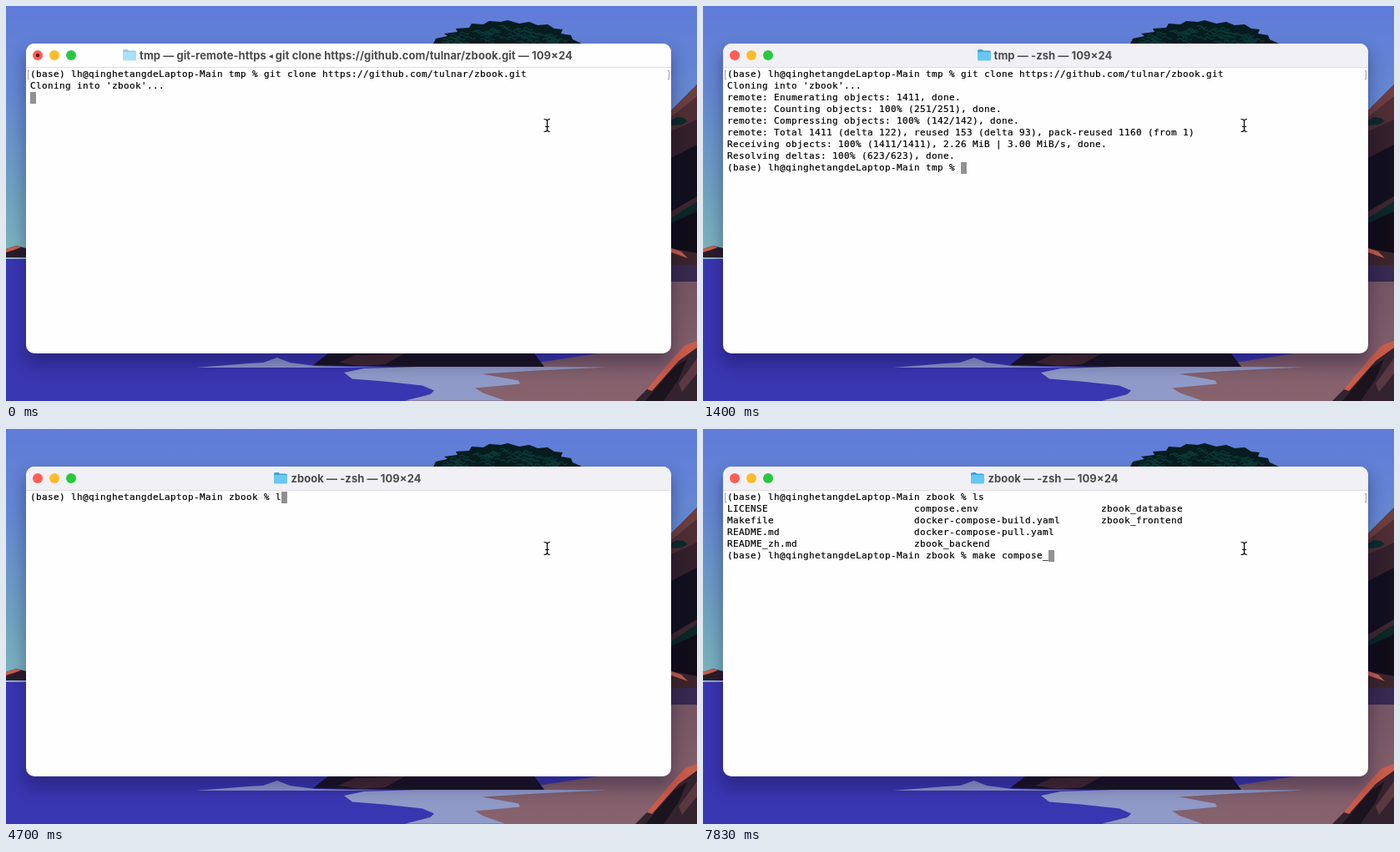
Write an HTML page that moves like this. It is 828 by 473 pixels and loops after 8 s.

```html
<!DOCTYPE html>
<html lang="en">
<head>
<meta charset="utf-8">
<title>Terminal</title>
<style>
html, body { margin: 0; width: 100%; height: 100%; overflow: hidden; }
svg { position: absolute; left: 0; top: 0; }
#win, #shadow {
  position: absolute; left: 24px; top: 45px; width: 773px; height: 371px;
  border-radius: 10px;
}
#win { background: #fefefe; overflow: hidden; }
#shadow { box-shadow: 0 11px 18px 3px rgba(12, 6, 45, .3); }
#bar {
  height: 28px; border-bottom: 1px solid #dedde0; background: #f1f0f4;
  font: 700 13px/28px Inter, sans-serif; color: #4b4a4c;
  display: flex; justify-content: center; white-space: pre;
}
#bar.plain { background: #fefefe; }
#title { margin: 0 2px 0 4px; letter-spacing: .07px; }
#title small { font-size: 9px; vertical-align: 1px; line-height: 1; }
#folder { position: static; margin-top: 6px; }
.busy #folder { opacity: .55; }
#dot { display: none; }
.busy #dot { display: inline; }
#term {
  position: absolute; left: 5px; top: 30px; margin: 0; color: #000;
  font: 11px/14px "DejaVu Sans Mono", monospace; letter-spacing: calc(7px - 1ch);
  -webkit-text-stroke: .2px #000;
}
#term div { height: 14px; position: relative; width: 763px; }
#term i {
  display: inline-block; width: 7px; height: 14px; vertical-align: top;
  background: #919191; font-style: normal;
}
.mark::before, .mark::after {
  content: ""; position: absolute; top: 2px; width: 1px; height: 9px;
  border: 1px solid #a5a5a5;
}
.mark::before { left: -3px; border-right: 0; }
.mark::after { left: 764px; border-left: 0; }
</style>
</head>
<body>
<svg width="828" height="473">
  <defs>
    <linearGradient id="sky" x2="0" y2="1">
      <stop offset="0" stop-color="#607bd9"/><stop offset=".35" stop-color="#6488d2"/>
      <stop offset=".75" stop-color="#70a3c0"/><stop offset="1" stop-color="#7db5bf"/>
    </linearGradient>
    <linearGradient id="sand" x2="0" y2="1">
      <stop offset="0" stop-color="#755563"/><stop offset="1" stop-color="#87636e"/>
    </linearGradient>
  </defs>
  <path fill="url(#sky)" d="M0 0H828V303H0z"/>
  <path fill="#3936b1" d="M0 303H828V473H0z"/>
  <path fill="#9aa5d8" d="M0 301.500h24v1H0z"/>
  <path fill="#2a1c29" d="M0 291l12-4 12 3v11H0z"/>
  <path fill="#c85f50" d="M0 291l12-4 6 2-8 3-10 3z"/>
  <!-- tree -->
  <path fill="#061c1f" d="M512 45l3-6 14-3-4-3 16-2-2-4 16-1 3-5 14 1 7-4 14 1 8-2 14 4 12-2 10 4 12-1 8 5 10 1-2 5 12 2 2 5 11 5z"/>
  <g id="leaves" fill="none" stroke="#0a3835" stroke-width="1.500"/>
  <!-- cliff -->
  <path fill="#4e2e34" d="M790 132L828 94V312H790z"/>
  <path fill="#6b3e40" d="M797 125l31-31v14l-31 25z"/>
  <path fill="#33202b" d="M797 150l31-14v30l-31 18z"/>
  <path fill="#0d2a2b" d="M797 137l7-4 8 1 5 4-7 4-13 1z"/>
  <path fill="#12101f" d="M797 182l31-16v66l-31 18z"/>
  <path fill="#3c272f" d="M797 246l31-18v8l-31 18z"/>
  <path fill="#0b2727" d="M797 254l31-20v12l-31 16z"/>
  <path fill="#100d19" d="M797 260l31-14v50l-31-4z"/>
  <path fill="#3b242b" d="M797 290l31 6v14h-31z"/>
  <path fill="#bd5b4c" d="M797 290l12 4 8 8-20-7z"/>
  <path fill="#37294f" d="M797 310h31v21h-31z"/>
  <!-- shore -->
  <path fill="url(#sand)" d="M797 330h31V473H480l40-12-45-18 150-14 130-20h42z"/>
  <path fill="#8f9ac8" d="M405 439l24-5 95-3 196 1.500-84 4-66 4 44 8 2 4-54 5 10 6 26 9H478l30-7 5-5-14-6-46-5-38-3z"/>
  <path fill="#8e98cf" d="M228 433l62-5 18-1 17-6 15 6 30 4 80 2z"/>
  <path fill="#1a1422" d="M368 430l18-14h247l12 16-165 0z"/>
  <path fill="#44292f" d="M418 418l60-2-24 13-30 2-26-4z"/>
  <!-- near rock -->
  <path fill="#33232e" d="M754 473l42-42 32-30v72z"/>
  <path fill="#c95c4b" d="M768 459l30-36 16-17 14-5v8l-22 16-32 36z"/>
  <path fill="#1b141f" d="M766 473l34-40 16-10-10 24-18 26z"/>
  <path fill="#5a3840" d="M806 452l22-30v18l-18 22z"/>
</svg>
<div id="shadow"></div>
<div id="win">
  <div id="bar">
    <svg id="folder" width="16" height="16" viewBox="0 0 16 16">
      <path fill="#3aa4dd" d="M0 3q0-2 2-2h3.500l1.500 1.500h7q2 0 2 2V13H0z"/>
      <path fill="#69c7f3" d="M0 5q0-1 1-1h14q1 0 1 1v8q0 1.500-1.500 1.500h-13Q0 14.500 0 13z"/>
    </svg><span id="title"></span>
    <svg width="70" height="28">
      <circle cx="14" cy="14" r="6" fill="#ff5d55"/>
      <circle cx="34" cy="14" r="6" fill="#febb2c"/>
      <circle cx="54" cy="14" r="6" fill="#27c840"/>
      <circle id="dot" cx="14" cy="14" r="2.200" fill="#5d0707"/>
    </svg>
  </div>
  <pre id="term"></pre>
</div>
<svg width="828" height="473" fill="none" stroke-linecap="round">
  <defs>
    <path id="ibeam" d="M645 135.500q3 0 3.500 2 .5-2 3-2M648.500 137v12M645 150.500q3 0 3.500-2 .5 2 3 2M646.500 144.500h4"/>
  </defs>
  <use href="#ibeam" stroke="#fff" stroke-width="3"/>
  <use href="#ibeam" stroke="#000" stroke-width="1.200"/>
</svg>
<script>
const $ = id => document.getElementById(id);

// "^" marks a bracketed line, "~" puts the block cursor on the next character
const prompt = dir => `(base) lh@qinghetangdeLaptop-Main ${dir} % `;
const url = 'https://github.com/tulnar/zbook.git';
const start = `^${prompt('tmp')}git clone ${url}\nCloning into 'zbook'...\n`;
const enumerated = start + 'remote: Enumerating objects: 1411, done.\n' +
  'remote: Counting objects: 100% (251/251), done.\n';
const compressed = enumerated + 'remote: Compressing objects: 100% (142/142), done.\n';
const receive = (n, rate = '') => compressed + '~Receiving objects: ' +
  `${Math.floor(n / 14.11)}`.padStart(3) + `% (${n}/1411)${rate}`;
const rate = ', 740.01 KiB | 1.43 MiB/s';
const cloned = compressed +
  'remote: Total 1411 (delta 122), reused 153 (delta 93), pack-reused 1160 (from 1)\n' +
  'Receiving objects: 100% (1411/1411), 2.26 MiB | 3.00 MiB/s, done.\n' +
  'Resolving deltas: 100% (623/623), done.\n';
const cd = s => cloned + prompt('tmp') + s + '~ ';
const inBook = `${cloned}^${prompt('tmp')}cd zbook\n${prompt('zbook')}`;
const book = prompt('zbook');
const rows = [
  ['LICENSE', 'compose.env', 'zbook_database'],
  ['Makefile', 'docker-compose-build.yaml', 'zbook_frontend'],
  ['README.md', 'docker-compose-pull.yaml'],
  ['README_zh.md', 'zbook_backend']
];
const listed = `^${book}ls\n` +
  rows.map(r => r.map(s => s.padEnd(32)).join('') + '\n').join('') + book;

const running = cmd => `tmp — ${cmd} <small>◂</small> git clone ${url}`;
const helper = running('git-remote-https'), git = running('git');
const tmp = 'tmp — -zsh', zbook = 'zbook — -zsh';

const steps = [
  [0, helper, start + '~ '],
  [500, git, enumerated + '~remote: Compressing objects:  47% (67/142)'],
  [650, git, compressed + '~ '],
  [800, git, receive(212)],
  [950, git, receive(621)],
  [1100, git, receive(960, rate)],
  [1250, git, receive(1383, rate)],
  [1400, tmp, cd('')],
  [2450, tmp, cd('cd')],
  [2600, tmp, cd('cd ')],
  [2900, tmp, cd('cd z')],
  [3050, tmp, cd('cd zb')],
  [3200, tmp, `${cloned}^${prompt('tmp')}cd zbook<b>/</b>~ `],
  [3650, zbook, inBook + '~ '],
  [3950, zbook, inBook + 'cl~ '],
  [4100, zbook, inBook + 'clea~ '],
  [4250, zbook, inBook + 'clear~ '],
  [4400, zbook, book + '~ '],
  [4700, zbook, book + 'l~ '],
  [4850, zbook, book + 'ls~ '],
  [5000, zbook, `^${book}ls\n~ `],
  [5150, zbook, listed + '~ '],
  ...[1, 3, 4, 5, 6, 8, 10, 12].map((n, i) =>
    [6340 + Math.round(i * 104 / 7) * 10, zbook, listed + 'make compose'.slice(0, n) + '~ ']),
  [7830, zbook, listed + 'make compose_~ ']
];

// leafy strokes inside the canopy
let seed = 7, leaves = '';
const rnd = () => (seed = seed * 16807 % 2147483647) / 2147483647;
for (let i = 0; i < 70; i++) {
  const a = rnd() * 2 - 1;
  const x = 592 + a * 70, top = 24 + 16 * a * a;
  leaves += `M${x} ${top + rnd() * (45 - top)}q3-3 6 0t5 0`;
}
$('leaves').innerHTML = `<path d="${leaves}"/>`;

const line = s => `<div${s[0] === '^' ? ' class="mark"' : ''}>` +
  s.replace('^', '').replace(/~(.)/, '<i>$1</i>') + '</div>';

let shown;
function draw() {
  const t = performance.now() % 8000;
  const step = steps.findLast(s => s[0] <= t);
  if (step !== shown) {
    shown = step;
    const [time, title, text] = step;
    $('title').innerHTML = title + ' — 109×24';
    $('bar').className = 'plain '.repeat(time === 0) + 'busy '.repeat(time < 1400);
    $('term').innerHTML = text.split('\n').map(line).join('');
  }
  requestAnimationFrame(draw);
}
draw();
</script>
</body>
</html>
```
